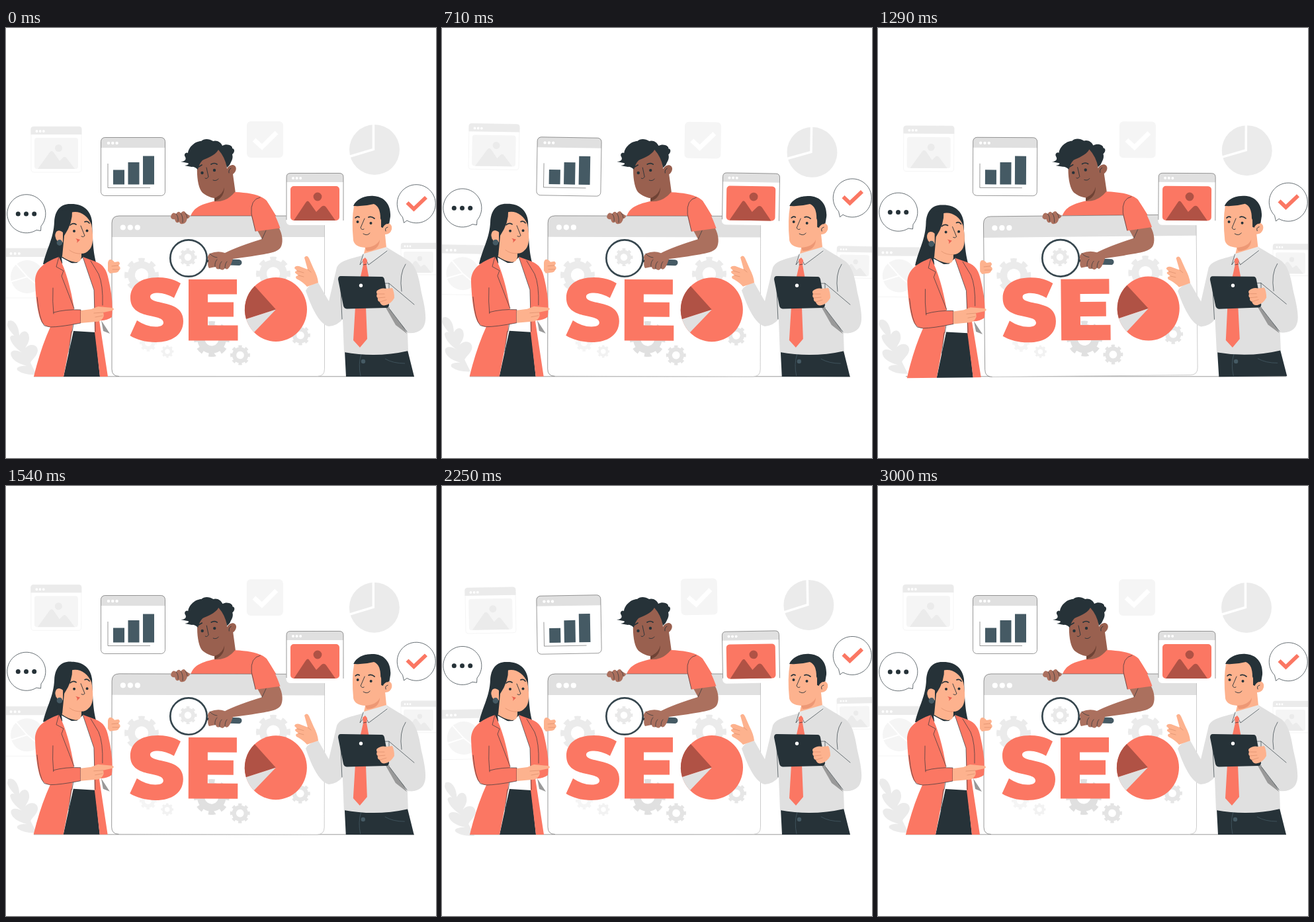
These frames come from a looping animation (650x650 px, 3.04 s). An HTML page:

```html
<!DOCTYPE html>
<html lang="en">
<head>
<meta charset="utf-8">
<title>SEO illustration</title>
<style>
  html, body { margin: 0; width: 100%; height: 100%; overflow: hidden; background: #fff; }
  svg { display: block; width: 650px; height: 650px; }
  .co { fill: #fb7763 } .rd { fill: #b05245 } .dk { fill: #263238 } .sl { fill: #455a64 }
  .g { fill: #e0e0e0 } .l { fill: #ebebeb } .p { fill: #f5f5f5 } .w { fill: #fff }
  .sk { fill: #fdb28e } .br { fill: #ab705e } .face { fill: #99604f } .sh { fill: #999 }
  .ln { fill: none; stroke: #263238; stroke-width: .65; stroke-linecap: round; stroke-linejoin: round }
  .feature { stroke-width: .9 }
  .brow { stroke-width: 1.7 }
  .edge { fill: none; stroke: #555; stroke-width: .6 }
  .faint { stroke: #aaa }
  .bubble { fill: #fff; stroke: #263238; stroke-width: .7 }
  .pale { fill: #fff; stroke: #f5f5f5 }
  .gap { fill: none; stroke: #fff }
  .fold { stroke: #d98a68 }
</style>
</head>
<body>
<svg viewBox="0 0 650 650">
  <g id="back">
    <rect class="pale" x="38" y="149" width="76" height="69" rx="4"/>
    <path class="l" d="M37.500 161V153Q37.500 149 42 149H110Q114.500 149 114.500 153V161Z"/>
    <g class="w dots" data-p="46.500 156 5.200 1.900"></g>
    <rect class="p" x="43" y="166" width="66" height="47" rx="4"/>
    <path class="l" d="M48 213L66 188Q69 184 72 188L81 201L86 196Q89 193 92 197L104 213Z"/>
    <circle class="l" cx="79.500" cy="181.500" r="5.500"/>

    <rect class="p" x="364" y="141" width="55" height="55" rx="6"/>
    <path class="gap" d="M375 169L387 180L409 158" stroke-width="7"/>

    <circle class="l" cx="557" cy="184" r="38"/>
    <path class="gap" d="M555.500 144V183.500L517 195" stroke-width="3.500"/>

    <rect class="pale" x="-12" y="333" width="90" height="75" rx="4"/>
    <path class="l" d="M-12 346V333H74Q78 333 78 337V346Z"/>
    <g class="w dots" data-p="7.500 341 6.200 2"></g>
    <circle class="p" cx="32" cy="376" r="25"/>
    <path class="gap" d="M13 354L32 376L6 384M32 376L54 394" stroke-width="2"/>

    <rect class="pale" x="597" y="325" width="58" height="48" rx="4"/>
    <path class="l" d="M597 334V328Q597 325 600 325H655V334Z"/>
    <g class="w dots" data-p="603 330 4 1.400"></g>
    <rect class="p" x="601" y="338" width="45" height="32" rx="3"/>
    <path class="l" d="M605 370L617 353Q619 351 621 353L627 361L631 358Q633 357 635 360L643 370Z"/>
    <circle class="l" cx="625.500" cy="348.500" r="3.700"/>

    <path class="l" d="M3 443C12 439 20 451 20 465C25 455 35 457 35 469C35 475 31 480 29 484C36 476 48 478 48 488C47 496 39 501 37 506L46 524Q28 525 18 518C12 512 26 510 32 511Q12 506 8 496C4 486 17 485 26 492Q8 480 6 468C8 462 15 465 18 471Q3 456 2 449Z"/>
  </g>

  <path class="edge" d="M42 526.800H617"/>

  <g class="float">
    <path class="bubble" d="M53 299.500A29 29 0 1 0 46 305.500L52.500 306.500Z"/>
    <g class="dk dots" data-p="18.300 281 12.200 3.500"></g>
  </g>
  <g class="float">
    <path class="bubble" d="M599.500 286A29 29 0 1 1 606 291L601.500 294.500Z"/>
    <path d="M606.500 264L616.500 273.500L635 256" fill="none" stroke="#fb7763" stroke-width="5.800"/>
  </g>

  <g id="team">
    <!-- peeking man, behind the panel -->
    <path class="face" d="M289 208C288 226 291 243 297 249C303 254 311 257 315 257V264Q334 267 347 250L343 221C350 216 349 207 342 207Q336 208 334 213L331 180L300 186Z"/>
    <path d="M315 257Q327 253 330 241Q330 257 315 262Z" fill="#6f4335"/>
    <path class="dk" d="M290 214Q284 209 281 210L270 208C277 207 277 204 274 204L264 202C270 202 273 199 271 195C268 191 272 187 275 189C276 180 286 171 295 171C299 167 307 167 313 171C319 169 325 173 327 178C334 174 343 178 342 182C347 183 345 189 342 191C344 198 340 202 338 207L334 211Q331 195 321 184C316 193 303 197 297 200Q292 205 290 214Z"/>
    <path class="ln feature" d="M303 211L306 225Q303 229 301 227M313 230Q318 232 321 228M340 212Q336 214 337 219"/>
    <path class="ln brow" d="M291 210L296 207M310 206Q315 203 319 206"/>
    <g class="dk"><circle cx="296.500" cy="219" r="2.200"/><circle cx="315" cy="215" r="2.200"/></g>
    <path class="co" d="M278 288C282 272 293 267 314 262Q333 264 346 248C370 249 386 253 394 261L412 290Z"/>

    <!-- panel -->
    <rect class="w" x="160" y="284" width="321.500" height="242.500" rx="11"/>
    <path class="g" d="M160 316V295Q160 284 171 284H470Q481.500 284 481.500 295V316Z"/>
    <path class="edge" d="M470 284H171Q160 284 160 295V515.500Q160 526.500 171 526.500"/>
    <path class="edge faint" d="M171 526.500H470.500Q481.500 526.500 481.500 515.500V295Q481.500 284 470 284"/>
    <g class="w dots" data-p="176.800 301.500 11 4.100"></g>
    <g id="gears"></g>

    <path class="co" d="M264 386L254 408Q241 400.500 230 400.500C222 400.500 218 402.500 218 406C218 420 268 409 268 443C268 463 252 475 226 475C211 475 197 471 187.500 465L198 442Q212 451.500 226 451.500C235 451.500 238 449 238 445C238 431 188 442 188 408C188 389 203 377 230 377Q250 377 264 386Z"/>
    <path class="co" d="M276 380H349V402.500H305V414.500H344V436.500H305V449.500H350.500V472.500H276Z"/>
    <ellipse class="co" cx="408" cy="425.500" rx="47" ry="48.500"/>
    <path class="rd" d="M408 425.500L376 390A47 48.500 0 0 0 363 440Z"/>
    <path class="g" d="M408 425.500L363 440A47 48.500 0 0 0 375 460Z"/>

    <!-- magnifier, arm and sleeve -->
    <path d="M303 352L340 354" stroke="#263238" stroke-width="4"/>
    <path d="M337 354L352 354.500" stroke="#455a64" stroke-width="9" stroke-linecap="round"/>
    <circle cx="276" cy="348" r="27.700" fill="#fff" stroke="#37474f" stroke-width="2.700"/>
    <g id="lensGear"></g>
    <path class="br" d="M380 306L412 301C419 313 419 326 415 332C409 341 386 342 372 345L343 349Q341 356 338 361Q334 367 331 363Q328 368 323 364Q318 366 317 361L307 363Q304 359 306 351Q303 345 308 341Q320 336 331 340Q351 330 387 319Z"/>
    <path class="ln" d="M387 319L393 306M316 361Q315 354 319 350M323 364Q322 357 326 353M331 363Q331 356 334 353M308 341Q312 346 319 347"/>
    <path class="co" d="M371 284C369 267 375 256 386 256C397 261 408 284 414.500 302.500L377 307.500Z"/>
    <path class="ln" d="M377 307L371 281Q369 259 384 256"/>
    <path class="br" d="M249 286C250 279 254 278 257 281Q261 275 264 280Q269 274 272 280L278 284Q277 288 274 288Q272 296 267 296Q263 297 262 293Q257 297 255 289Q251 290 249 286Z"/>
    <path class="ln" d="M257 281Q261 285 260 292M264 280Q268 285 267 294M271 280Q274 283 274 287"/>

    <!-- woman -->
    <path class="dk" d="M99 266C83 265 74 275 73 293C72 318 62 332 56 357L136 354C133 342 131 330 130 292C128 276 117 266 99 266Z"/>
    <path class="w" d="M84 347L104 358L117 346L132 380L137 462H100Z"/>
    <path class="sk" d="M98 279C110 275 124 283 129 297C132 312 133 330 125 336Q121 341 114 341V346Q113 355 105 354Q93 352 84 345L85 326C77 328 72 314 76 309Q80 304 86 309Q97 297 98 279Z"/>
    <path class="ln fold" d="M114 341Q104 342 96 336"/>
    <path class="dk" d="M100 276Q101 295 88 314L85 345L78 344L74 300L80 275Z"/>
    <path class="sk" d="M86 309C79 303 73 308 75 316Q77 326 86 324Z"/>
    <circle class="sl" cx="81" cy="324.500" r="4.400"/>
    <g class="dk"><circle cx="103" cy="307" r="2"/><circle cx="122.500" cy="306.500" r="2"/></g>
    <path class="ln feature" d="M113 299L119 314Q117 317 114 315"/>
    <path class="ln brow" d="M97 298Q101 294 106 297M119 293Q123 291 126 295"/>
    <path d="M105 318L112 320L107 325Q109 321 105 318Z" fill="#e9604f"/>
    <path class="dk" d="M102 458L135 460L142 527H87Z"/>
    <path class="co" d="M80 346C58 354 44 364 44 383C45 412 49 440 56 447Q60 452 67 452Q52 485 42 527H87L100 459L103 424C98 394 91 367 80 346Z"/>
    <path class="co" d="M70 432Q90 425 113 426V446Q82 452 67 452Z"/>
    <path class="co" d="M116 346L135 353C148 358 152 366 155 380C160 401 162 420 160 437Q152 443 141 442L154 527H142L134 459L133 396Z"/>
    <path class="sh" d="M144 442L157 462L147 458Z"/>
    <path class="ln" d="M80 346L76 361L87 367L84 375L103 424M102 448L100 459M71 393Q70 414 72 432M72 430Q90 425 113 426V446Q82 452 67 452L58 450Q50 441 47 407M116 346L133 396L135 459M128 352L140 372Q147 388 146 419M99 459L95 490"/>
    <path class="sk" d="M113 427L129 425L139 421L161 423Q165 425 161 427L147 430Q149 435 146 439Q143 444 136 444L113 446Z"/>
    <path class="ln fold" d="M147 430L133 431M146 435L135 437"/>
    <path class="sk" d="M154 355C155 348 160 349 164 354L170 353Q174 356 170 359Q175 363 171 366Q170 370 164 370L157 371L154 367Z"/>
    <path class="ln fold" d="M170 359L160 360M171 365L161 365"/>
  </g>

  <g id="man">
    <path class="dk" d="M512 488Q560 499 607 487L617 527H514Z"/>
    <path d="M537 493Q532 508 536 526M573 500Q585 507 603 507" fill="none" stroke="#455a64" stroke-width=".8"/>
    <circle class="sl" cx="540" cy="504" r="3.200"/>
    <path class="g" d="M538 344L575 331C586 338 600 346 609 352C620 360 624 375 628 400C633 420 636 438 633 447C630 458 620 462 607 461L608 488Q560 499 511 490L509 440Q501 450 488 451C473 448 461 420 453 397Q457 388 472 385L488 413L500 362C504 352 520 349 538 344Z"/>
    <path class="sh" d="M573 421L588 424L606 462L589 449Z"/>
    <path class="g" d="M577 383L606 411L633 440Q630 461 612 461Q604 459 580 425Z"/>
    <path class="ln" d="M508 440L506 395M579 386L617 418M606 459L580 425M598 398Q594 372 604 357"/>
    <path class="dk" d="M525 269C530 257 545 253 556 254C573 255 582 268 581 285L578 303L568 301L558 275Z"/>
    <path class="sk" d="M526 269Q541 270 556 266Q566 270 566 288L570 298C575 291 585 296 583 304Q581 312 573 312L575 332L549 345L541 341L543 332Q527 331 525 321Q522 290 526 269Z"/>
    <path class="dk" d="M556 265Q566 267 567 282L567 301Q574 304 577 300L581 282L571 262Z"/>
    <path class="sk" d="M570 301Q575 293 582 298Q585 307 577 311L570 311Z"/>
    <path d="M543 332Q560 331 565 320Q564 337 545 337Z" fill="#ed9875"/>
    <g class="dk"><circle cx="531.500" cy="293" r="2"/><circle cx="551.500" cy="295" r="2"/></g>
    <path class="ln feature" d="M542 288L536 302Q538 306 541 304M540 311Q546 315 550 310M577 301Q572 302 574 307"/>
    <path class="ln brow" d="M528 287Q531 284 534 286M548 286Q552 284 557 288"/>
    <path d="M541 341L575 331L578 338L546 357L539 353L535 357Z" fill="#e8e8e8"/>
    <path class="ln" d="M540 342L535 358L543 348L548 358L576 337"/>
    <path class="co" d="M539 350L543 347L546 351L545 358L549 380H535L540 358ZM528 421H544L546 470L535 483L525 472Z"/>
    <path class="ln" d="M540 358L545 357"/>
    <path class="dk" d="M506 375L568 376Q571 376 572 380L579 418Q579 423 575 423L515 424.500Q511 424 510 420L502 380Q502 375 506 375Z"/>
    <path class="ln" d="M571 386H579V396"/>
    <circle class="w" cx="536.500" cy="389.300" r="2.700"/>
    <path class="sk" d="M561 397Q567 392 575 394L584 393Q587 399 587 408Q582 417 574 419Q567 421 565 414Q561 413 562 408Q559 406 561 402Q559 399 561 397Z"/>
    <path class="ln fold" d="M561 402L572 402M562 408L573 407M565 414L575 411"/>
    <path class="sk" d="M451 347Q455 342 458 348L465 364Q471 375 472 385L455 391Q449 384 439 379Q436 375 442 374L438 371Q435 368 440 367L436 363Q437 359 443 360L456 365Z"/>
    <path class="ln fold" d="M440 367L450 370M442 374L450 376M456 365L461 369"/>
  </g>

  <g id="chart">
    <rect class="w" x="143.500" y="165.500" width="97" height="88" rx="6"/>
    <path class="g" d="M143.500 181V171.500Q143.500 165.500 149.500 165.500H234.500Q240.500 165.500 240.500 171.500V181Z"/>
    <rect class="edge" x="143.500" y="165.500" width="97" height="88" rx="6"/>
    <g class="w dots" data-p="155 174 6.300 2.200"></g>
    <path class="sl" d="M162 214.500h17v22h-17ZM184.500 203h17v33.500h-17ZM207 193.500h17v43h-17Z"/>
    <path class="edge" d="M154 205V241.500H218"/>
  </g>

  <g id="photo">
    <rect class="w" x="423.500" y="219.500" width="87" height="78.500" rx="6"/>
    <path class="g" d="M424 233V225.500Q424 219.500 430 219.500H504Q510 219.500 510 225.500V233Z"/>
    <path class="edge" d="M424 290V225.500Q424 219.500 430 219.500H504Q510 219.500 510 225.500V291"/>
    <g class="w dots" data-p="434 227 5.600 2"></g>
    <rect class="co" x="430" y="239" width="74" height="52" rx="5"/>
    <path class="rd" d="M435 291L453 264Q456 259 459 264L469 278L477 270Q481 267 484 271L498 291Z"/>
    <circle class="rd" cx="471" cy="255" r="6.400"/>
  </g>
</svg>
<script>
const $ = id => document.getElementById(id);

for (const row of document.querySelectorAll('.dots')) {
  const [x, y, step, r] = row.dataset.p.split(' ').map(Number);
  row.innerHTML = [0, 1, 2].map(i => `<circle cx="${x + i * step}" cy="${y}" r="${r}"/>`).join('');
}

// Eight teeth come from the dashed outer ring, one of them pointing up
const gear = (x, y, r, color) =>
  `<g transform="translate(${x} ${y}) rotate(-11.25)" fill="none" stroke="${color}">
    <circle r="${r * .6}" stroke-width="${r * .42}"/>
    <circle r="${r * .87}" stroke-width="${r * .26}" pathLength="16" stroke-dasharray="1"/></g>`;

$('gears').innerHTML =
  gear(205, 373.500, 26, '#ebebeb') + gear(404, 371.500, 26, '#ebebeb') +
  gear(311, 470, 27, '#e0e0e0') + gear(354, 494.500, 15, '#e4e4e4') +
  gear(445, 464.500, 15, '#e6e6e6') + gear(215, 476, 13, '#f5f5f5') +
  gear(244, 489, 9.500, '#f2f2f2');
$('lensGear').innerHTML = gear(275, 346.500, 13.500, '#e9e9e9');

// Linear swing: 0, +1, 0, -1, 0 over one period
const swing = (t, period) => {
  const p = t / period % 1;
  return p < .25 ? 4 * p : p < .75 ? 2 - 4 * p : 4 * p - 4;
};
const bubbles = document.querySelectorAll('.float');
const sways = [
  ['back', 3000, 325, 334], ['chart', 3000, 192, 209.5], ['photo', 3000, 467, 258.5],
  ['team', 1500, 262, 347], ['man', 1500, 536, 390]
];

function draw(now) {
  const t = now % 3040;
  for (const [id, period, x, y] of sways)
    $(id).setAttribute('transform', `rotate(${swing(t, period)} ${x} ${y})`);
  const lift = 9.3 * (1 - Math.abs(1 - t / 750 % 2));
  for (const b of bubbles) b.setAttribute('transform', `translate(0 ${-lift})`);
}

const start = performance.now();
(function tick() {
  draw(performance.now() - start);
  requestAnimationFrame(tick);
})();
</script>
</body>
</html>
```
